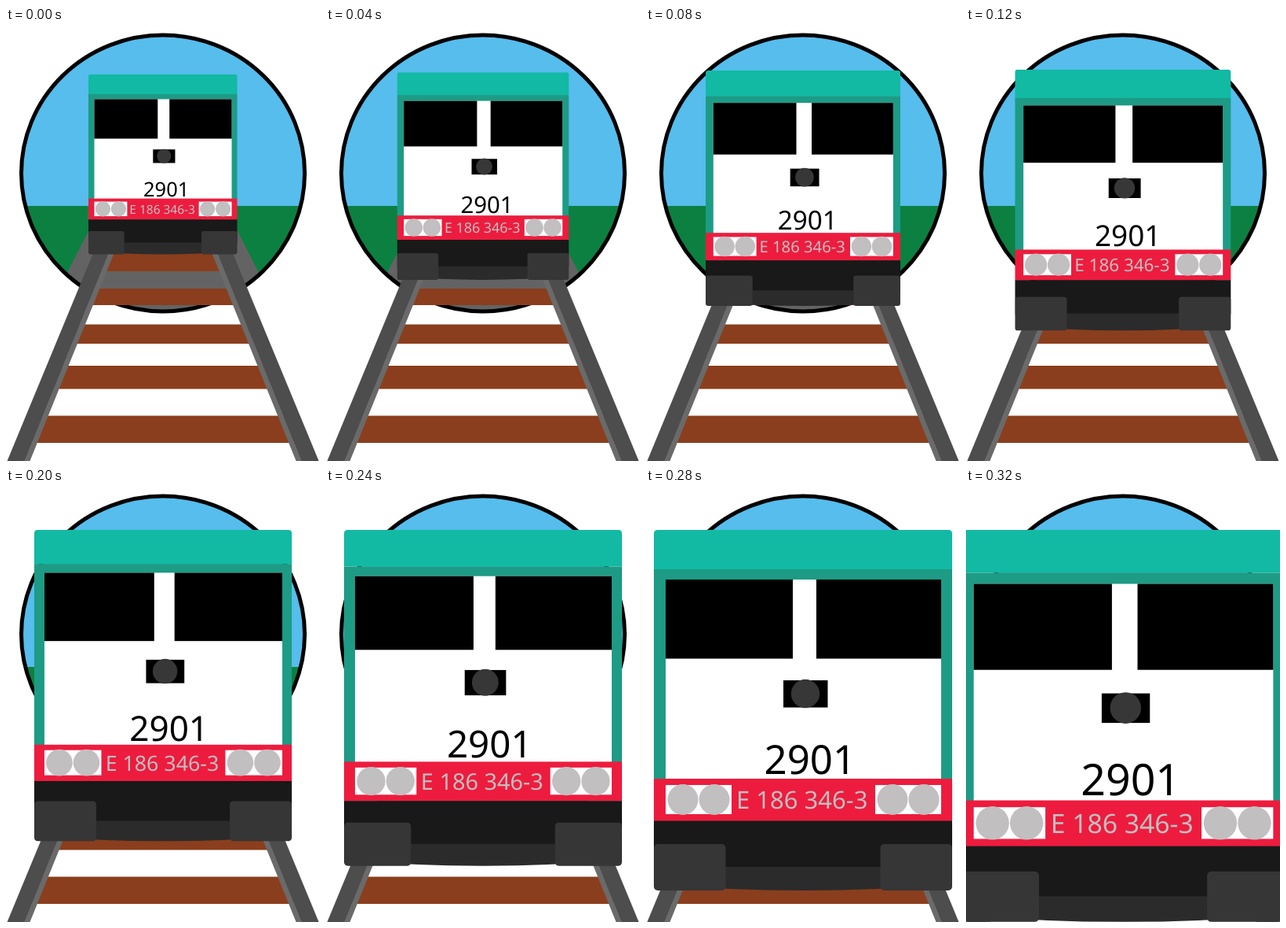
These frames come from a looping animation (400x550 px, 0.36 s). An HTML page without scripts:

```html
<!DOCTYPE html>
<html lang="en">
<head>
<meta charset="utf-8">
<title>Approaching train</title>
<style>
  html, body { margin: 0; width: 100%; height: 100%; overflow: hidden; background: #fff; }
  svg { display: block; width: 100%; height: 100%; }
  text { font-family: "Noto Sans", "Open Sans", sans-serif; text-rendering: geometricPrecision; }

  /* The train comes closer in nine hard steps of 40 ms */
  .train { transform-origin: 0 0; animation: approach 360ms step-end infinite; }
  @keyframes approach {
    0%      { transform: translate(105px, 59px) scale(.4987); }
    11.111% { transform: translate(90.5px, 56.3px) scale(.5757); }
    22.222% { transform: translate(76px, 54px) scale(.6526); }
    33.333% { transform: translate(62.3px, 52.8px) scale(.7237); }
    44.444% { transform: translate(49px, 52px) scale(.7947); }
    55.555% { transform: translate(36px, 52px) scale(.8632); }
    66.666% { transform: translate(23px, 52px) scale(.9316); }
    77.777% { transform: translate(10px, 52px) scale(1); }
    88.888%, 100% { transform: translate(-6.5px, 52px) scale(1.087); }
  }
</style>
</head>
<body>
<svg viewBox="0 0 400 550" xmlns="http://www.w3.org/2000/svg">
  <defs>
    <clipPath id="view"><ellipse cx="200" cy="184.5" rx="180.5" ry="175.5"/></clipPath>
    <g id="rail">
      <path d="M1.5 550 L122.7 258 H142.5 L24 550Z" fill="#4d4d4d"/>
      <path d="M23.5 550 L142 258 H149 L30.5 550Z" fill="#6a6a6a"/>
    </g>
    <g id="lamps">
      <rect width="84" height="37" fill="#fff"/>
      <g fill="#c1bfc0">
        <circle cx="22" cy="18.5" r="19.5"/>
        <circle cx="62" cy="18.5" r="19.5"/>
      </g>
    </g>
    <rect id="buffer" width="91.5" height="59" rx="5" fill="#363636"/>
  </defs>

  <!-- Landscape -->
  <g clip-path="url(#view)">
    <rect width="400" height="226" fill="#56bdec"/>
    <rect y="226" width="400" height="150" fill="#0c8040"/>
    <path d="M110 248 H290 L348 362 H52Z" fill="#636363"/>
  </g>
  <ellipse cx="200" cy="184.5" rx="180.5" ry="175.5" fill="none" stroke="#000" stroke-width="5"/>

  <!-- Track -->
  <g fill="#8a3e1d">
    <rect x="123" y="280" width="154" height="29"/>
    <rect x="106" y="331" width="188" height="21"/>
    <rect x="86" y="376.5" width="228" height="24.5"/>
    <rect x="62" y="429" width="276" height="29.5"/>
    <rect x="34" y="492.5" width="332" height="34.5"/>
  </g>
  <use href="#rail"/>
  <use href="#rail" transform="matrix(-1 0 0 1 400 0)"/>

  <g class="train">
    <!-- Cab -->
    <path d="M0 50 V5 Q0 0 5 0 H375 Q380 0 380 5 V50Z" fill="#12b9a3"/>
    <rect y="50" width="380" height="267" fill="#1d9b85"/>
    <rect x="15" y="63" width="351" height="254" fill="#fff"/>
    <rect x="15" y="63" width="162" height="100.5"/>
    <rect x="207" y="63" width="159" height="100.5"/>
    <rect x="165" y="191" width="56.5" height="34.5"/>
    <circle cx="193" cy="208" r="18.2" fill="#373737"/>
    <text x="140.5" y="310" font-size="51">2901</text>

    <!-- Red band -->
    <rect y="316" width="380" height="54" fill="#ed1c3e"/>
    <use href="#lamps" x="15" y="324"/>
    <use href="#lamps" x="282" y="324"/>
    <text x="105" y="354" font-size="31" fill="#c1bfc0">E 186 346-3</text>

    <!-- Underframe -->
    <rect y="369.5" width="380" height="60" fill="#191919"/>
    <path d="M10 428 H370 V450 Q285 458 190 458 Q95 458 10 450Z" fill="#2b2b2b"/>
    <use href="#buffer" y="399"/>
    <use href="#buffer" x="288.5" y="399"/>
  </g>
</svg>
</body>
</html>
```
